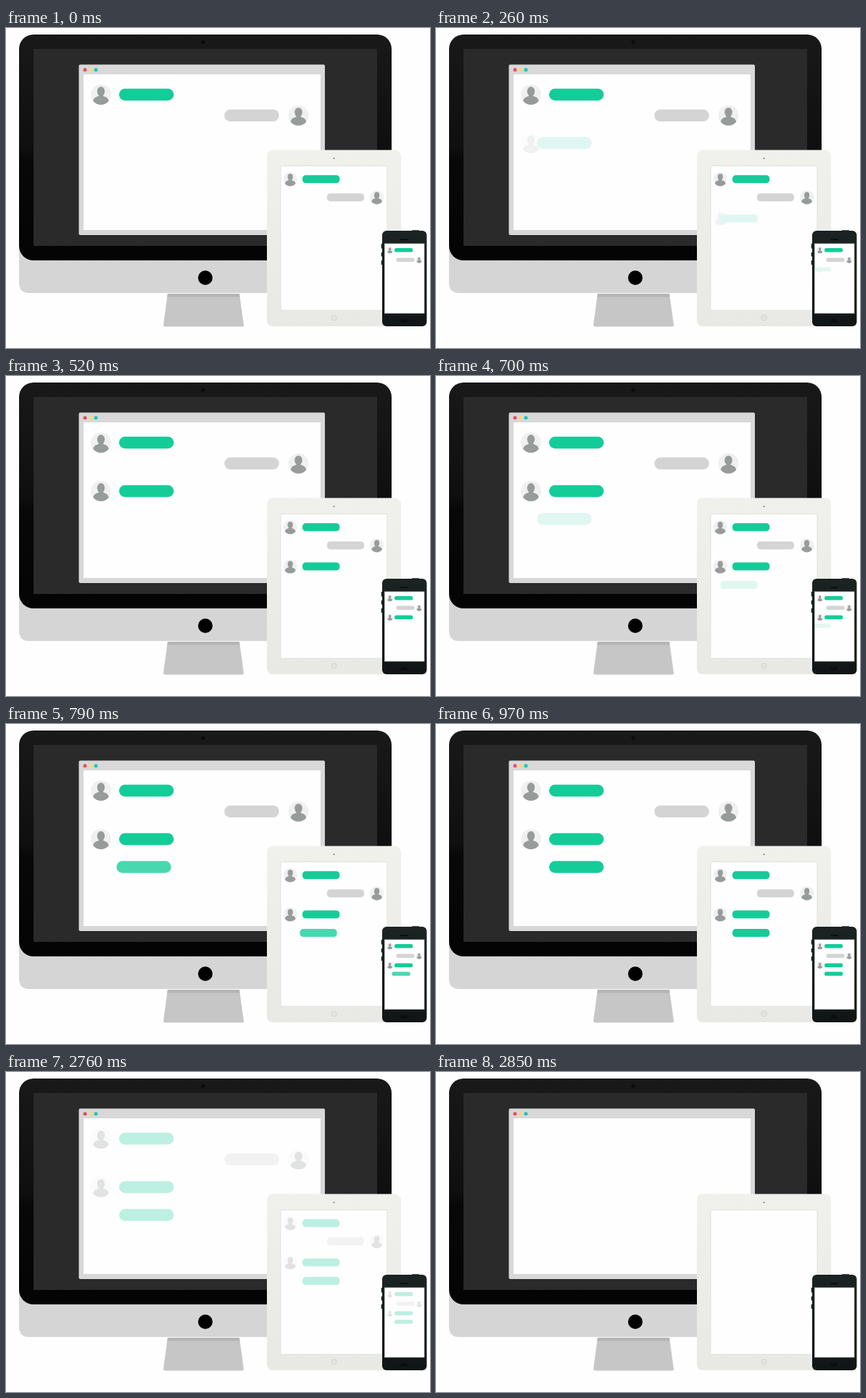
An HTML page that plays this animation: 585 by 442 pixels, repeating every 3.3 s.

```html
<!DOCTYPE html>
<html lang="en">
<head>
<meta charset="utf-8">
<title>Chat on three screens</title>
<style>
  html, body { margin: 0; width: 100%; height: 100%; overflow: hidden; background: #fefefe; }
  svg { display: block; width: 585px; height: 442px; }
</style>
</head>
<body>
<svg viewBox="0 0 585 442" xmlns="http://www.w3.org/2000/svg">
  <defs>
    <linearGradient id="bezel" x1="0" y1="0" x2="0" y2="1">
      <stop offset="0" stop-color="#191919"/>
      <stop offset=".5" stop-color="#0f0f0f"/>
      <stop offset=".56" stop-color="#080808"/>
      <stop offset="1" stop-color="#040404"/>
    </linearGradient>
    <linearGradient id="tabletBody" x1="0" y1="0" x2="0" y2="1">
      <stop offset="0" stop-color="#f0f1ed"/>
      <stop offset="1" stop-color="#e8e9e4"/>
    </linearGradient>
    <linearGradient id="phoneBody" x1="0" y1="0" x2="0" y2="1">
      <stop offset="0" stop-color="#1c2323"/>
      <stop offset="1" stop-color="#111515"/>
    </linearGradient>
    <clipPath id="phoneClip"><rect x="522.5" y="298" width="54.5" height="96"/></clipPath>
    <g id="avatar">
      <circle r="14" fill="#f0f0f0"/>
      <g fill="#979b9a">
        <ellipse cy="-4.4" rx="5.3" ry="6.5"/>
        <path d="M-10.7 9C-10.2 5-8 3.6-3 2V-1H3V2C8 3.6 10.2 5 10.7 9A14 14 0 0 1-10.7 9Z"/>
      </g>
    </g>
  </defs>

  <!-- desktop -->
  <path d="M223 367H322L328 410Q328 412.5 325.500 412.500H219.500Q217 412.500 217.200 410Z" fill="#c6c6c6"/>
  <path d="M223 367H322L322.600 371.500H222.400Z" fill="#b5b5b5"/>
  <path d="M18 295H532V352Q532 366 518 366H32Q18 366 18 352Z" fill="#d5d5d5"/>
  <rect x="18" y="9" width="514" height="312" rx="20" fill="url(#bezel)"/>
  <rect x="38" y="29" width="474" height="272" fill="#2a2a2a"/>
  <circle cx="272" cy="19.500" r="2.500" fill="#0a0a0a"/>
  <circle cx="275" cy="345" r="10" fill="#000"/>
  <rect x="100.500" y="50.500" width="339.500" height="235.500" rx="2" fill="#d8d8d8"/>
  <rect x="106.500" y="63.500" width="328" height="216" fill="#fefefe" stroke="#cbcbcb" stroke-width=".6"/>
  <circle cx="109" cy="57.800" r="2.500" fill="#ee4b62"/>
  <circle cx="116.700" cy="57.800" r="2.500" fill="#f4dc74"/>
  <circle cx="124" cy="57.800" r="2.500" fill="#12c8ba"/>
  <g id="desktopChat"></g>

  <!-- tablet -->
  <rect x="360" y="168.500" width="185" height="243.500" rx="8" fill="url(#tabletBody)"/>
  <rect x="379" y="190.500" width="147" height="199.500" fill="#fefefe" stroke="#dce3de"/>
  <circle cx="452.500" cy="180" r="1.100" fill="#7b7d7b"/>
  <circle cx="452.500" cy="400.300" r="4.500" fill="#dcddd8"/>
  <rect x="450.700" y="398.500" width="3.600" height="3.600" rx=".8" fill="none" stroke="#f0f1ed" stroke-width=".8"/>
  <g id="tabletChat"></g>

  <!-- phone -->
  <path d="M518.500 298V304.500M518.500 310V315.500M518.500 321V327" stroke="#1a2020" stroke-width="1.500"/>
  <path d="M560 280H570" stroke="#1a2020" stroke-width="1.500"/>
  <rect x="519" y="280" width="61.500" height="132" rx="6" fill="url(#phoneBody)"/>
  <rect x="544" y="291.300" width="11" height="1.800" rx=".9" fill="#0a0d0d"/>
  <rect x="544.500" y="402" width="9.500" height="5" rx="2" fill="#0b0e0e"/>
  <rect x="522.500" y="298" width="54.500" height="96" fill="#fefefe" stroke="#c8cece" stroke-width=".8"/>
  <g clip-path="url(#phoneClip)"><g id="phoneChat"></g></g>
</svg>
<script>
const LOOP = 3300;
const GREEN = '#14cc98', GREY = '#d4d4d4';

const screens = [
  { id: 'desktopChat', r: 14, left: 131, right: 403.5, bubbles: [156, 301.3], w: 75.5, h: 16.5, rx: 8.25, rows: [92, 120.8, 159, 197.5] },
  { id: 'tabletChat', r: 9.6, left: 392.2, right: 511.6, bubbles: [409, 442.8], w: 51.3, h: 11, rx: 4.6, rows: [208.8, 233.9, 263, 288.6] },
  { id: 'phoneChat', r: 4.5, left: 529.7, right: 570, bubbles: [536, 538.4], w: 25.3, h: 5.5, rx: 2.6, rows: [306.8, 320.2, 333.3, 345] }
];

const avatar = (s, x, y) =>
  `<use href="#avatar" transform="translate(${x} ${y}) scale(${s.r / 14})"/>`;
const bubble = (s, x, y, fill) =>
  `<rect class="bubble" x="${x}" y="${y - s.h / 2}" width="${s.w}" height="${s.h}" rx="${s.rx}" fill="${fill}"/>`;

function buildChat(s) {
  const [near, far] = s.bubbles, [a, b, c, d] = s.rows;
  const chat = document.getElementById(s.id);
  chat.innerHTML =
    avatar(s, s.left, a) + bubble(s, near, a, GREEN) +
    bubble(s, far, b, GREY) + avatar(s, s.right, b) +
    `<g class="late">${avatar(s, s.left, c)}${bubble(s, near, c, GREEN)}</g>` +
    `<g class="late">${bubble(s, near, d, GREEN)}</g>`;
  return { chat, late: [...chat.querySelectorAll('.late')] };
}
const chats = screens.map(buildChat);

// Each key is [start, opacity, bubble offset], held until the next one.
const arrivals = [
  [[0, 0, -19], [260, .125, -16.6], [350, .77, -3.6], [430, .96, -.6], [520, 1, 0]],
  [[0, 0, -19], [700, .125, -16.6], [790, .77, -3.6], [970, 1, 0]]
];
const fade = [[0, 1], [2680, .7], [2760, .28], [2850, 0]];
const keyAt = (keys, t) => keys.filter(k => k[0] <= t).pop();

function render(t) {
  const all = keyAt(fade, t)[1];
  for (const { chat, late } of chats) {
    chat.setAttribute('opacity', all);
    late.forEach((group, i) => {
      const [, opacity, dx] = keyAt(arrivals[i], t);
      group.setAttribute('opacity', opacity);
      group.querySelector('.bubble').setAttribute('transform', `translate(${dx} 0)`);
    });
  }
}

function tick() {
  render(performance.now() % LOOP);
  requestAnimationFrame(tick);
}
tick();
</script>
</body>
</html>
```
